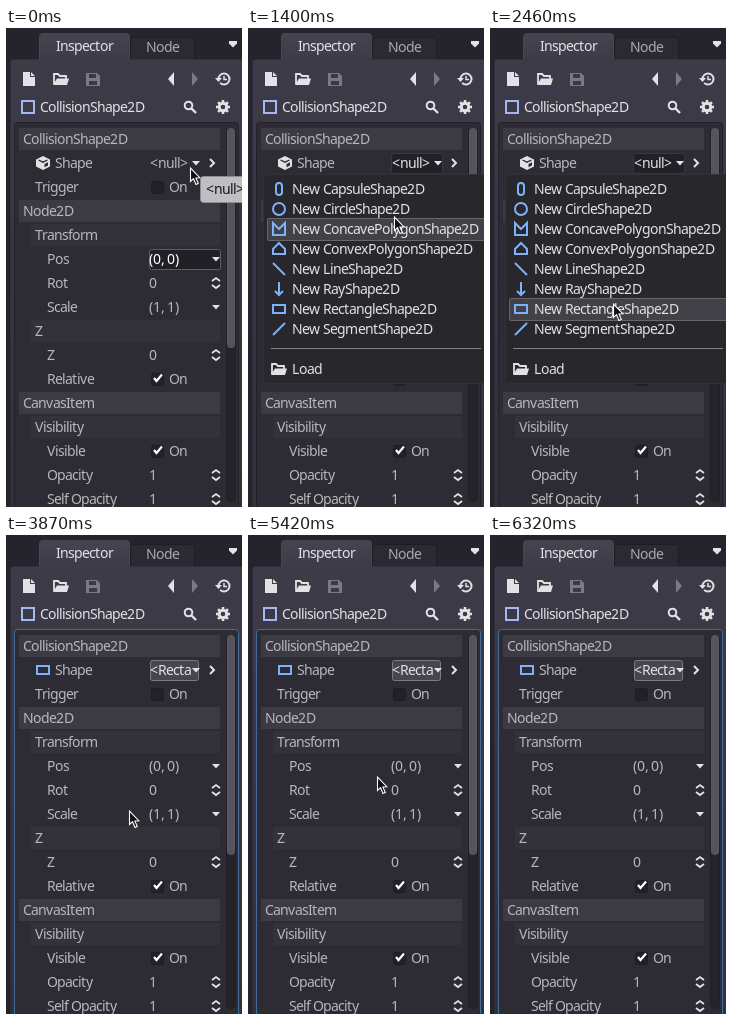
Animation, 236 px wide and 479 px high, one loop 6.62 s. Source, as an HTML page with a canvas:

```html
<!DOCTYPE html>
<html lang="en">
<head>
<meta charset="utf-8">
<title>Inspector</title>
<style>
html, body { margin: 0; width: 100%; height: 100%; overflow: hidden; background: #25232b; }
canvas { display: block; width: 236px; height: 479px; }
</style>
</head>
<body>
<canvas id="stage"></canvas>
<script>
const W = 236, H = 479, LOOP = 6620;
const OPEN = 570, CLOSE = 3870;
const FONT = '"Noto Sans", "Open Sans", sans-serif';
const BLUE = '#7fb0fa', LIGHT = '#e2e2e4', TEXT = '#b8b7bc', DIM = '#7b7982';
const CATEGORY = '#3c3a43', GROUP = '#33313a';

const canvas = document.getElementById('stage');
const dpr = window.devicePixelRatio || 1;
canvas.width = W * dpr;
canvas.height = H * dpr;
const c = canvas.getContext('2d');

// Pointer keys: time, x, y
const path = [
  [0, 184, 139], [900, 184, 139], [1400, 146, 188], [1550, 142, 205],
  [1810, 131, 230], [2220, 124, 265], [2460, 123, 275], [4500, 123, 275],
  [4600, 118, 268], [4700, 121, 264], [4880, 121, 264], [5180, 128, 241],
  [5390, 128, 241], [5440, 130, 242], [5750, 166, 338], [6075, 195, 446],
  [6320, 202, 481], [6620, 202, 500]
];

const menu = ['CapsuleShape2D', 'CircleShape2D', 'ConcavePolygonShape2D', 'ConvexPolygonShape2D',
  'LineShape2D', 'RayShape2D', 'RectangleShape2D', 'SegmentShape2D'];

// Rows below the shape field: label, kind, value
const rows = [
  ['Trigger', 'check', false, 29], ['Node2D', 'category'], ['Transform', 'group'],
  ['Pos', 'drop', '(0, 0)'], ['Rot', 'spin', '0'], ['Scale', 'drop', '(1, 1)'],
  ['Z', 'group'], ['Z', 'spin', '0'], ['Relative', 'check', true],
  ['CanvasItem', 'category'], ['Visibility', 'group'], ['Visible', 'check', true],
  ['Opacity', 'spin', '1'], ['Self Opacity', 'spin', '1']
];

const advances = {};
function advance(ch) {
  if (!(ch in advances)) {
    c.save();
    c.font = '1400px ' + FONT;
    advances[ch] = Math.floor(c.measureText(ch).width / 100);
    c.restore();
  }
  return advances[ch];
}

// Letters sit on whole pixels, as in the toolkit's own text layout
function text(s, x, mid, color = TEXT) {
  c.font = '14px ' + FONT;
  c.fillStyle = color;
  for (const ch of s) {
    c.fillText(ch, x, mid + 5);
    x += advance(ch);
  }
}

function rect(x, y, w, h, color) {
  c.fillStyle = color;
  c.fillRect(x, y, w, h);
}

function box(x, y, w, h, r, fill, stroke) {
  c.beginPath();
  c.roundRect(x + .5, y + .5, w - 1, h - 1, r);
  if (fill) { c.fillStyle = fill; c.fill(); }
  if (stroke) { c.strokeStyle = stroke; c.lineWidth = 1; c.stroke(); }
}

function trace(pts, close) {
  c.beginPath();
  pts.forEach(([x, y]) => c.lineTo(x, y));
  if (close) c.closePath();
}

function line(pts, color, width = 2, close = false) {
  trace(pts, close);
  c.strokeStyle = color;
  c.lineWidth = width;
  c.stroke();
}

function fill(pts, color) {
  trace(pts, true);
  c.fillStyle = color;
  c.fill();
}

function ring(x, y, r, color, width = 2) {
  c.beginPath();
  c.arc(x, y, r, 0, Math.PI * 2);
  c.strokeStyle = color;
  c.lineWidth = width;
  c.stroke();
}

function shade(y0, y1, top, bottom) {
  const g = c.createLinearGradient(0, y0, 0, y1);
  g.addColorStop(0, top);
  g.addColorStop(1, bottom);
  return g;
}

function arrow(x, y, w = 4) {
  fill([[x - w, y - 2], [x + w, y - 2], [x, y + 2.5]], LIGHT);
}

function chevron(x, y, dir) {
  line([[x - dir * 2, y - 4], [x + dir * 2, y], [x - dir * 2, y + 4]], LIGHT);
}

function spinner(x, y) {
  line([[x - 4, y - 2], [x, y - 5], [x + 4, y - 2]], LIGHT, 1.8);
  line([[x - 4, y + 2], [x, y + 5], [x + 4, y + 2]], LIGHT, 1.8);
}

function checkbox(y, on) {
  box(145, y - 6, 13, 13, 2, '#222028', '#1e1c23');
  if (on) line([[148, y - 1], [150.5, y + 2], [156, y - 4.5]], '#fff', 2.2);
  text('On', 163, y);
}

function folder(x, y) {
  line([[x + 1, y + 5], [x + 1, y - 5], [x + 5, y - 5], [x + 7, y - 3], [x + 13, y - 3], [x + 13, y]], LIGHT, 1.8);
  fill([[x + 4, y - .5], [x + 16, y - .5], [x + 14, y + 6], [x, y + 6]], LIGHT);
}

function toolbar() {
  fill([[17, 44], [24, 44], [24, 49], [29, 49], [29, 58], [17, 58]], LIGHT);
  fill([[25, 44], [29, 48], [25, 48]], LIGHT);
  folder(47, 51);

  fill([[80, 45], [91, 45], [94, 48], [94, 58], [80, 58]], DIM);
  rect(83, 46, 7, 4, '#3b3945');
  rect(83, 53, 8, 4, '#3b3945');

  fill([[168, 44], [168, 58], [162, 51]], LIGHT);
  fill([[186, 44], [186, 58], [192, 51]], DIM);

  c.beginPath();
  c.arc(218, 51, 5.5, Math.PI, Math.PI * 2.75);
  c.strokeStyle = LIGHT;
  c.lineWidth = 2;
  c.stroke();
  fill([[209, 50], [216, 50], [212.5, 54]], LIGHT);
  line([[218, 48], [218, 51.5], [221, 51.5]], LIGHT, 1.5);

  line([[16, 73], [28, 73], [28, 85], [16, 85]], '#a5b7f3', 2, true);
  text('CollisionShape2D', 34, 79, LIGHT);

  ring(182.5, 77.5, 3.8, LIGHT);
  line([[185.5, 80.5], [190, 85]], LIGHT, 2.4);

  ring(217, 79, 3.8, LIGHT, 3);
  for (let i = 0; i < 8; i++) {
    const a = i * Math.PI / 4, dx = Math.cos(a), dy = Math.sin(a);
    line([[217 + dx * 4, 79 + dy * 4], [217 + dx * 7, 79 + dy * 7]], LIGHT, 2.6);
  }
}

function frame(focused) {
  rect(0, 0, W, H, '#25232b');
  box(124, 9, 65, 26, 3, '#2b2932', '#1f1d24');
  box(33, 5, 91, 32, 3, shade(5, 31, '#464451', '#3d3b48'), '#47454f');
  text('Inspector', 50, 18, LIGHT);
  text('Node', 140, 19, '#aaa9af');
  fill([[223, 13], [231, 13], [231, 15.5], [227, 19.5], [223, 15.5]], LIGHT);

  box(4, 31, 240, 460, 3, shade(31, H, '#3d3b48', '#32303b'));
  rect(34, 30, 89, 3, '#3d3b48');
  toolbar();

  box(8, 94, 225, 400, 3, '#2d2b33', focused ? '#456a9c' : '#222028');
  box(220, 100, 10, 374, 4, '#25232a', '#211f26');
  box(221, 100, 8, 220, 3, '#55535e', '#5a5863');
}

function header(label, y, x, color) {
  rect(x, y - 11, 214 - x, 22, color);
  text(label, x + 4, y);
}

function cube(x, y) {
  fill([[x, y - 7], [x + 7, y - 3.5], [x + 7, y + 3.5], [x, y + 7], [x - 7, y + 3.5], [x - 7, y - 3.5]], LIGHT);
  line([[x - 4.5, y - 3], [x, y - .8], [x + 4.5, y - 3]], '#2d2b33', 1.3);
  fill([[x + 1.5, y + 1], [x + 5, y - .8], [x + 5, y + 2.5], [x + 1.5, y + 4.3]], '#2d2b33');
}

function shapeRow(t) {
  const y = 135;
  text('Shape', 49, y);
  if (t >= CLOSE) {
    line([[31, 131], [43, 131], [43, 139], [31, 139]], BLUE, 2, true);
    box(144, 125, 49, 21, 2, '#47454e', '#7b7982');
    text('<Recta', 144, y, LIGHT);
  } else {
    cube(37, y);
    if (t >= OPEN) box(143, 125, 52, 21, 2, '#222027', '#38363f');
    text('<null>', 144, y, t >= OPEN ? LIGHT : TEXT);
  }
  arrow(190, y);
  chevron(206, y, 1);
}

function properties(t) {
  header('CollisionShape2D', 111, 13, CATEGORY);
  shapeRow(t);
  rows.forEach(([label, kind, value, x = 41], i) => {
    const y = 159 + i * 24;
    if (kind === 'category') return header(label, y, 13, CATEGORY);
    if (kind === 'group') return header(label, y, 25, GROUP);
    text(label, x, y);
    if (kind === 'check') return checkbox(y, value);
    const active = label === 'Pos' && t < OPEN;
    if (active) box(143, y - 10, 72, 21, 2, '#222027', '#5d5b65');
    text(value, 143, y, active ? '#fff' : TEXT);
    if (kind === 'drop') arrow(210, y);
    else spinner(210, y);
  });
}

// One small icon per menu entry, centred on x, y
const icons = [
  (x, y) => {
    c.beginPath();
    c.roundRect(x - 3, y - 6, 6, 12, 3);
    c.strokeStyle = BLUE;
    c.lineWidth = 2;
    c.stroke();
  },
  (x, y) => ring(x, y, 6, BLUE),
  (x, y) => line([[x - 6, y - 6], [x, y], [x + 6, y - 6], [x + 6, y + 6], [x - 6, y + 6]], BLUE, 2, true),
  (x, y) => line([[x, y - 6], [x + 6, y], [x + 6, y + 5], [x - 6, y + 5], [x - 6, y]], BLUE, 2, true),
  (x, y) => line([[x - 6, y - 6], [x + 6, y + 6]], BLUE),
  (x, y) => {
    line([[x, y - 7], [x, y + 5]], BLUE);
    line([[x - 4, y + 2], [x, y + 6], [x + 4, y + 2]], BLUE);
  },
  (x, y) => line([[x - 6, y - 4], [x + 6, y - 4], [x + 6, y + 4], [x - 6, y + 4]], BLUE, 2, true),
  (x, y) => line([[x - 6, y + 6], [x + 6, y - 6]], BLUE)
];

function popup(pointerY) {
  box(15, 146, 240, 210, 4, '#28272c', '#323138');
  const hover = Math.floor((pointerY - 147) / 20);
  menu.forEach((name, i) => {
    const y = 161 + i * 20;
    if (i === hover) box(19, y - 11, 230, 23, 1, '#424148', '#66656c');
    icons[i](31, y);
    text('New ' + name, 44, y, LIGHT);
  });
  rect(23, 320, 210, 1, '#85848a');
  folder(23, 341);
  text('Load', 44, 341, LIGHT);
}

function tooltip() {
  box(194, 148, 60, 27, 3, '#bfbec2', '#8f8e94');
  text('<null>', 200, 161, '#18171b');
}

function pointer([x, y]) {
  const shape = [[.5, 1], [.5, 14.5], [3.5, 11.7], [6, 17.5], [8.3, 16.5], [5.9, 10.9], [9.8, 10.7]];
  const pts = shape.map(([px, py]) => [x + px, y + py]);
  fill(pts, '#111');
  line(pts, '#fff', 1.1, true);
}

function slope(i, k) {
  const a = path[i], b = path[i + 1];
  return a && b ? (b[k] - a[k]) / (b[0] - a[0]) : 0;
}

// Monotone tangent: zero at rests and turns
function tangent(i, k) {
  const a = slope(i - 1, k), b = slope(i, k);
  return a * b > 0 ? 2 * a * b / (a + b) : 0;
}

function pointerAt(t) {
  let i = 0;
  while (i < path.length - 2 && path[i + 1][0] <= t) i++;
  const a = path[i], b = path[i + 1], d = b[0] - a[0], u = (t - a[0]) / d;
  return [1, 2].map(k => {
    const v = 1 - u;
    return Math.round(a[k] * (1 + 2 * u) * v * v + tangent(i, k) * d * u * v * v +
      b[k] * u * u * (3 - 2 * u) - tangent(i + 1, k) * d * u * u * v);
  });
}

function draw(t) {
  const at = pointerAt(t);
  c.setTransform(dpr, 0, 0, dpr, 0, 0);
  frame(t >= CLOSE);
  properties(t);
  if (t < OPEN) tooltip();
  else if (t < CLOSE) popup(at[1]);
  if (t < 6320) pointer(at);
}

const start = performance.now();
function tick() {
  draw((performance.now() - start) % LOOP);
  requestAnimationFrame(tick);
}
tick();
</script>
</body>
</html>
```
